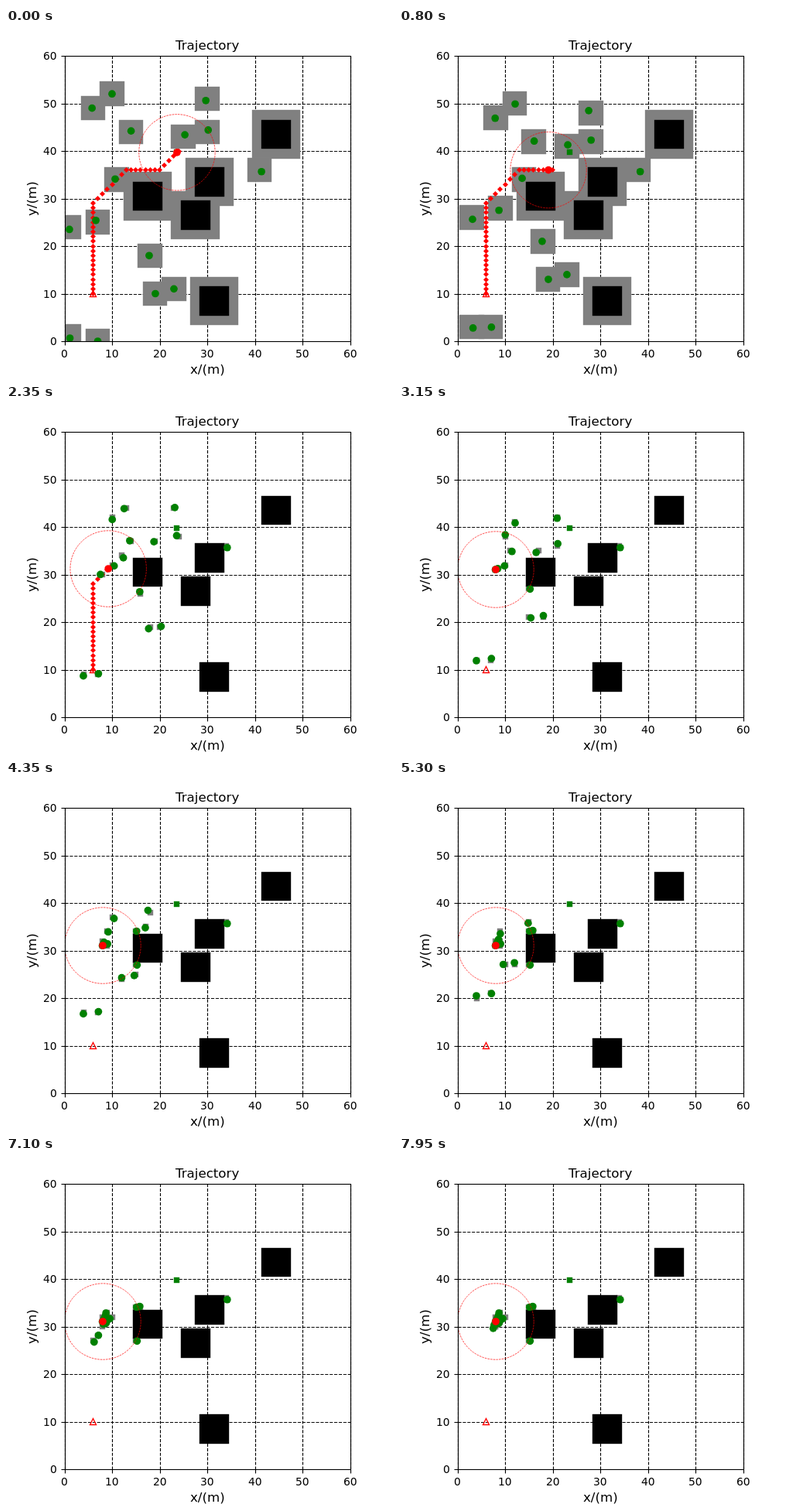
These frames come from a looping animation (500 px wide and 450 px high, 8 s). An HTML page with a canvas:

```html
<!DOCTYPE html>
<html lang="en">
<head>
<meta charset="utf-8">
<title>Trajectory</title>
<style>
  html, body { margin: 0; width: 100%; height: 100%; overflow: hidden; background: #fff; }
  canvas { display: block; }
</style>
</head>
<body>
<canvas id="stage" width="500" height="450"></canvas>
<script>
const ctx = document.getElementById("stage").getContext("2d");
const STEP = 50, STEPS = 160;
const UNIT = 6.15, LEFT = 75.5, BOTTOM = 405, SIZE = 369;
const GRAY = "#808080", GREEN = "#008000", RED = "#f00";
const DOT_SPEED = 0.2, ROBOT_SPEED = 0.378, SPACING = 0.5, BLOCK_REACH = 3.5;

const px = u => LEFT + u * UNIT;
const py = v => BOTTOM - v * UNIT;
const snap = p => Math.floor(p + 0.5) + 0.5;
const gap = (a, b) => Math.hypot(a.x - b.x, a.y - b.y);
const points = s => s.split(" ").map(p => {
  const [x, y] = p.split(",").map(Number);
  return { x, y };
});

const start = { x: 23.65, y: 39.7 }, goal = { x: 6, y: 10 };
const blocks = points("44.5,43.5 17.5,30.5 30.5,33.5 27.5,26.5 31.5,8.5");
const course = [start, ...points("19.9,36 14.6,36 9.2,31.2 8.05,31.05")];
const homes = points("10,52 5.8,49 29.7,50.6 14,44.2 25.3,43.4 30.2,44.4 41.4,35.65 10.65,34.1 " +
                     "6.6,25.4 1.05,23.5 17.8,18 23,11 19.1,10 1.15,0.65 7,0");

function robotAt(step) {
  let left = step * ROBOT_SPEED;
  for (let i = 1; i < course.length; i++) {
    const a = course[i - 1], b = course[i], length = gap(a, b);
    if (left < length) {
      const f = left / length;
      return { x: a.x + (b.x - a.x) * f, y: a.y + (b.y - a.y) * f, moving: true };
    }
    left -= length;
  }
  return { ...course[course.length - 1], moving: false };
}

const hitsBlock = p => blocks.some(b =>
  Math.max(Math.abs(p.x - b.x), Math.abs(p.y - b.y)) < BLOCK_REACH);

// Each dot chases the robot along the nearest of eight compass headings
function chase(dot, robot, dots) {
  const distance = gap(dot, robot);
  if (distance < DOT_SPEED) return dot;
  const eighth = Math.PI / 4;
  const heading = Math.round(Math.atan2(robot.y - dot.y, robot.x - dot.x) / eighth) * eighth;
  const next = {
    x: dot.x + DOT_SPEED * Math.cos(heading),
    y: dot.y + DOT_SPEED * Math.sin(heading)
  };
  const crowded = dots.some(d => gap(d, robot) < distance && gap(d, next) < SPACING);
  return crowded || hitsBlock(next) ? dot : next;
}

// The dots set off one step after the robot
const history = [homes, homes];
while (history.length < STEPS) {
  const dots = history[history.length - 1], robot = robotAt(history.length - 1);
  history.push(dots.map(d => chase(d, robot, dots)));
}

// Widest safety margin, up to two cells, that leaves the robot's cell free
function marginFor(robot, dots) {
  const x = Math.ceil(robot.x), y = Math.ceil(robot.y);
  const cells = dots.map(d =>
    Math.max(Math.abs(Math.round(d.x) - x), Math.abs(Math.round(d.y) - y)));
  return Math.max(0, Math.min(2, Math.min(...cells) - 1));
}

// Square markers covering every cell within reach of the centre
function cells(c, reach, color) {
  const x = Math.floor(px(c.x - reach)) - 3.19, y = Math.floor(py(c.y + reach)) - 3.19;
  ctx.fillStyle = color;
  ctx.fillRect(x, y, Math.floor(px(c.x + reach)) + 4.19 - x,
                     Math.floor(py(c.y - reach)) + 4.19 - y);
}

function disc(p, color) {
  ctx.fillStyle = color;
  ctx.beginPath();
  ctx.arc(px(p.x), py(p.y), 4.86, 0, 2 * Math.PI);
  ctx.fill();
}

function marker(p, corners) {
  const x = Math.floor(px(p.x)) + 0.5, y = Math.floor(py(p.y)) + 0.5;
  ctx.beginPath();
  corners.forEach(([dx, dy]) => ctx.lineTo(x + dx, y + dy));
  ctx.closePath();
}

function line(x1, y1, x2, y2) {
  ctx.beginPath();
  ctx.moveTo(x1, y1);
  ctx.lineTo(x2, y2);
  ctx.stroke();
}

// align: 0.5 centres the text on x, 1 ends it there
function text(s, x, y, size, align) {
  ctx.font = size + "px 'DejaVu Sans', sans-serif";
  ctx.fillStyle = "#000";
  ctx.fillText(s, Math.round(x - ctx.measureText(s).width * align), Math.round(y));
}

function drawGrid() {
  ctx.strokeStyle = "#000";
  ctx.lineWidth = 1.11;
  ctx.setLineDash([4.11, 1.78]);
  for (let u = 0; u <= 60; u += 10) {
    line(snap(px(u)), snap(py(0)), snap(px(u)), snap(py(60)));
    line(snap(px(0)), snap(py(u)), snap(px(60)), snap(py(u)));
  }
  ctx.setLineDash([]);
}

function drawAxes() {
  ctx.strokeStyle = "#000";
  ctx.lineWidth = 1.11;
  ctx.strokeRect(snap(px(0)), snap(py(60)), SIZE, SIZE);
  for (let u = 0; u <= 60; u += 10) {
    const x = snap(px(u)), y = snap(py(u));
    line(x, snap(BOTTOM), x, snap(BOTTOM) + 5);
    line(snap(LEFT), y, snap(LEFT) - 5, y);
    text(u, px(u), 426, 13.89, 0.5);
    text(u, LEFT - 9.72, py(u) + 5.3, 13.89, 1);
  }
  text("Trajectory", px(30), 28, 16.67, 0.5);
  text("x/(m)", px(30), 447, 16.67, 0.5);
  ctx.save();
  ctx.translate(39, Math.round(py(30)));
  ctx.rotate(-Math.PI / 2);
  text("y/(m)", 0, 0, 16.67, 0.5);
  ctx.restore();
}

// Planned route: down the diagonal, along y = 36, diagonally to the goal's column, then down
function drawRoute(robot, margin) {
  const r = 3.5, lift = margin === 2 ? 23 : 22;
  const stop = (x, y) => {
    marker({ x, y }, [[-r, 0], [0, -r], [r, 0], [0, r]]);
    ctx.fillStyle = RED;
    ctx.fill();
  };
  let y;
  for (let x = Math.ceil(robot.x); x >= goal.x; x--) {
    y = Math.max(x + 16, Math.min(36, x + lift));
    stop(x, y);
  }
  while (--y >= goal.y) stop(goal.x, y);
}

function drawRange(robot) {
  ctx.lineWidth = 0.7;
  ctx.setLineDash([2.57, 1.11]);
  ctx.beginPath();
  ctx.arc(px(robot.x), py(robot.y), 8 * UNIT, 0, -2 * Math.PI, true);
  ctx.stroke();
  ctx.setLineDash([]);
}

function draw(step) {
  const robot = robotAt(step), dots = history[step], margin = marginFor(robot, dots);

  ctx.fillStyle = "#fff";
  ctx.fillRect(0, 0, 500, 450);
  drawGrid();

  ctx.save();
  ctx.beginPath();
  ctx.rect(Math.round(LEFT), BOTTOM - SIZE, SIZE, SIZE);
  ctx.clip();
  if (margin) blocks.forEach(b => cells(b, 2.5 + margin, GRAY));
  dots.forEach(d => cells({ x: Math.round(d.x), y: Math.round(d.y) }, margin, GRAY));
  blocks.forEach(b => cells(b, 2.5, "#000"));

  cells(start, 0, GREEN);
  marker(goal, [[0, -4], [4, 4], [-4, 4]]);
  ctx.strokeStyle = RED;
  ctx.lineWidth = 1.39;
  ctx.stroke();
  if (robot.moving) drawRoute(robot, margin);
  dots.forEach(d => disc(d, GREEN));
  disc(robot, RED);
  drawRange(robot);
  ctx.restore();

  drawAxes();
}

const began = performance.now();
function tick() {
  draw(Math.floor((performance.now() - began) / STEP) % STEPS);
  requestAnimationFrame(tick);
}
tick();
</script>
</body>
</html>
```
